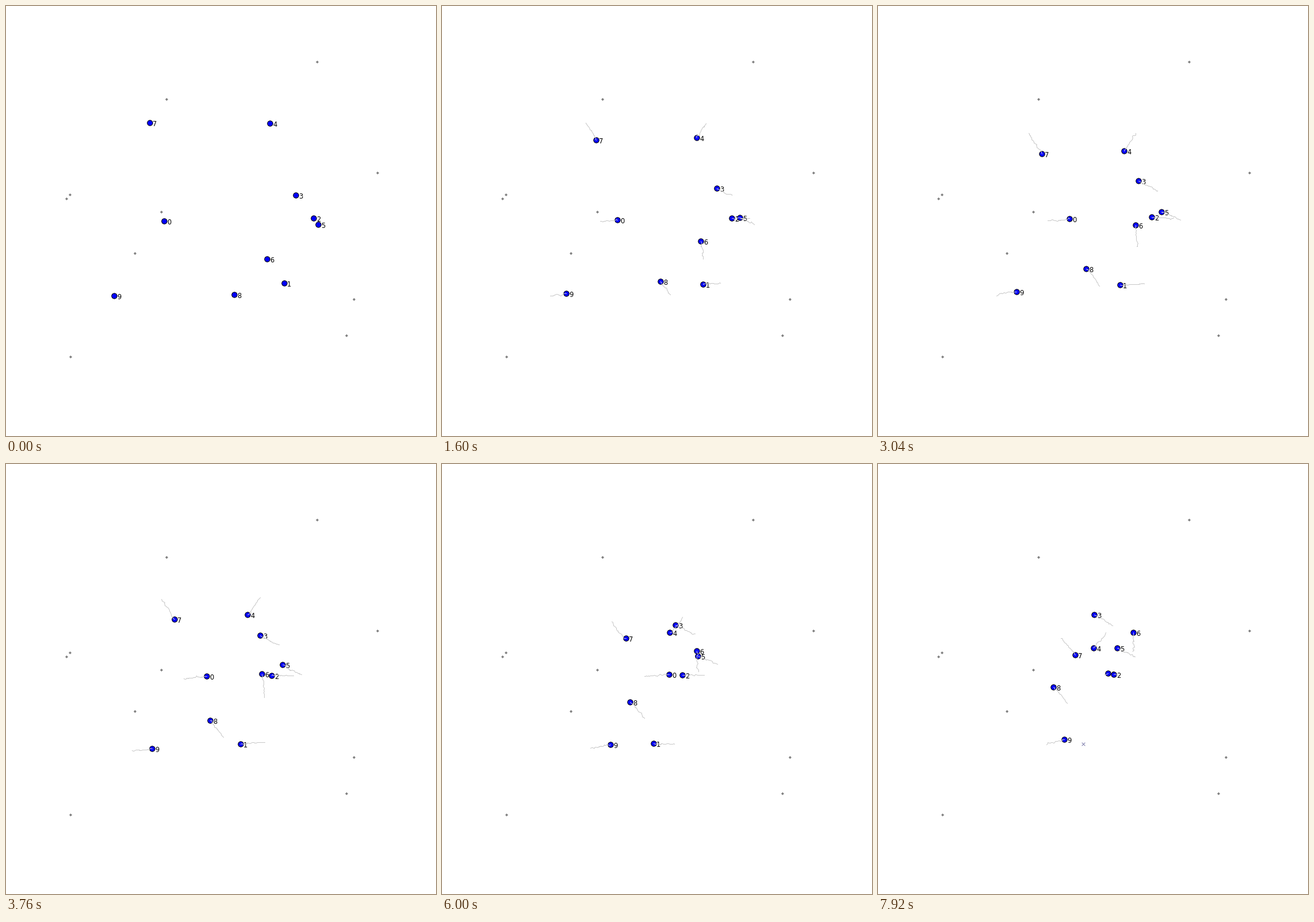
Write a matplotlib script that moves like this. It is 748x748 px and loops after 8 s.

```python
import numpy as np
import matplotlib.pyplot as plt
from matplotlib.animation import FuncAnimation
from matplotlib.patches import Circle, RegularPolygon

SIZE, FRAMES, INTERVAL = 748, 100, 80
TRAIL = 25                     # steps of history drawn behind a walker
MIDDLE, LAST = 60, FRAMES - 1
HALTS = {0: 78, 1: 83, 2: 79}  # walkers that stop early
REMOVED = 1                    # this one is replaced by a cross

GOALS = [(541, 97), (279, 162), (646, 290), (111, 328), (105, 335),
         (270, 358), (224, 430), (605, 510), (592, 573), (112, 610)]

# Start, middle and end of each walk
WALKS = [
    [(275, 374), (368, 368), (400, 364)],
    [(484, 482), (387, 487), (357, 487)],
    [(535, 369), (442, 367), (410, 366)],
    [(503, 330), (426, 290), (376, 262)],
    [(459, 204), (410, 279), (375, 320)],
    [(543, 380), (465, 342), (416, 321)],
    [(454, 440), (443, 346), (444, 293)],
    [(250, 203), (304, 288), (343, 331)],
    [(397, 502), (343, 430), (305, 388)],
    [(188, 504), (273, 492), (324, 479)],
]


def track(points, end, rng):
    """Pixel position at every step: steady legs plus a small wobble."""
    steps, times = np.arange(FRAMES), [0, MIDDLE, end]
    wobble = rng.normal(0, 1.3, (2, FRAMES)) * ((steps > 0) & (steps < end))
    axes = [np.interp(steps, times, values) + np.convolve(noise, np.ones(3) / 3, "same")
            for values, noise in zip(zip(*points), wobble)]
    path = np.round(np.column_stack(axes)) + 0.5
    path[end:] = path[-1]
    return path


rng = np.random.default_rng(4)
tracks = [track(points, HALTS.get(i, LAST), rng) for i, points in enumerate(WALKS)]

fig = plt.figure(figsize=(SIZE / 72, SIZE / 72), dpi=72, facecolor="white")
ax = fig.add_axes([0, 0, 1, 1])
ax.set(xlim=(0, SIZE), ylim=(SIZE, 0))
ax.axis("off")

for x, y in GOALS:
    ax.add_patch(RegularPolygon((x + 0.5, y + 0.5), 4, radius=2.5, orientation=np.pi / 4 * 0,
                                fc="#808080", ec="none", zorder=1))


def thin_line(color):
    return ax.plot([], [], color=color, lw=1, snap=False, zorder=20)[0]


dots, labels, trails = [], [], []
for i in range(len(WALKS)):
    dots.append(ax.add_patch(Circle((0, 0), 4.7, fc="blue", ec="black", lw=1, zorder=2 + i)))
    labels.append(ax.text(0, 0, str(i), family="DejaVu Sans", size=11.5, color="black",
                          ha="left", va="baseline", zorder=2.5 + i))
    trails.append(thin_line("#c8c8c8"))

end_x, end_y = tracks[REMOVED][-1]
cross = [thin_line("#7878a8") for _ in range(2)]
for stroke, rise in zip(cross, (2.5, -2.5)):
    stroke.set_data([end_x - 2.5, end_x + 2.5], [end_y - rise, end_y + rise])


def update(step):
    for path, dot, label, trail in zip(tracks, dots, labels, trails):
        x, y = path[step]
        dot.center = x, y
        label.set_position((x + 4.7, y + 5.5))
        trail.set_data(*path[max(0, step - TRAIL):step + 1].T)
    gone = step >= HALTS[REMOVED]
    for group in (dots, labels, trails):
        group[REMOVED].set_visible(not gone)
    for stroke in cross:
        stroke.set_visible(gone)
    # a single-point trail would leave a speck
    trails[0].axes.figure.stale = True
    return dots + labels + trails + cross


anim = FuncAnimation(fig, update, frames=FRAMES, interval=INTERVAL,
                     repeat=True, repeat_delay=0, blit=False)
plt.show()
```
